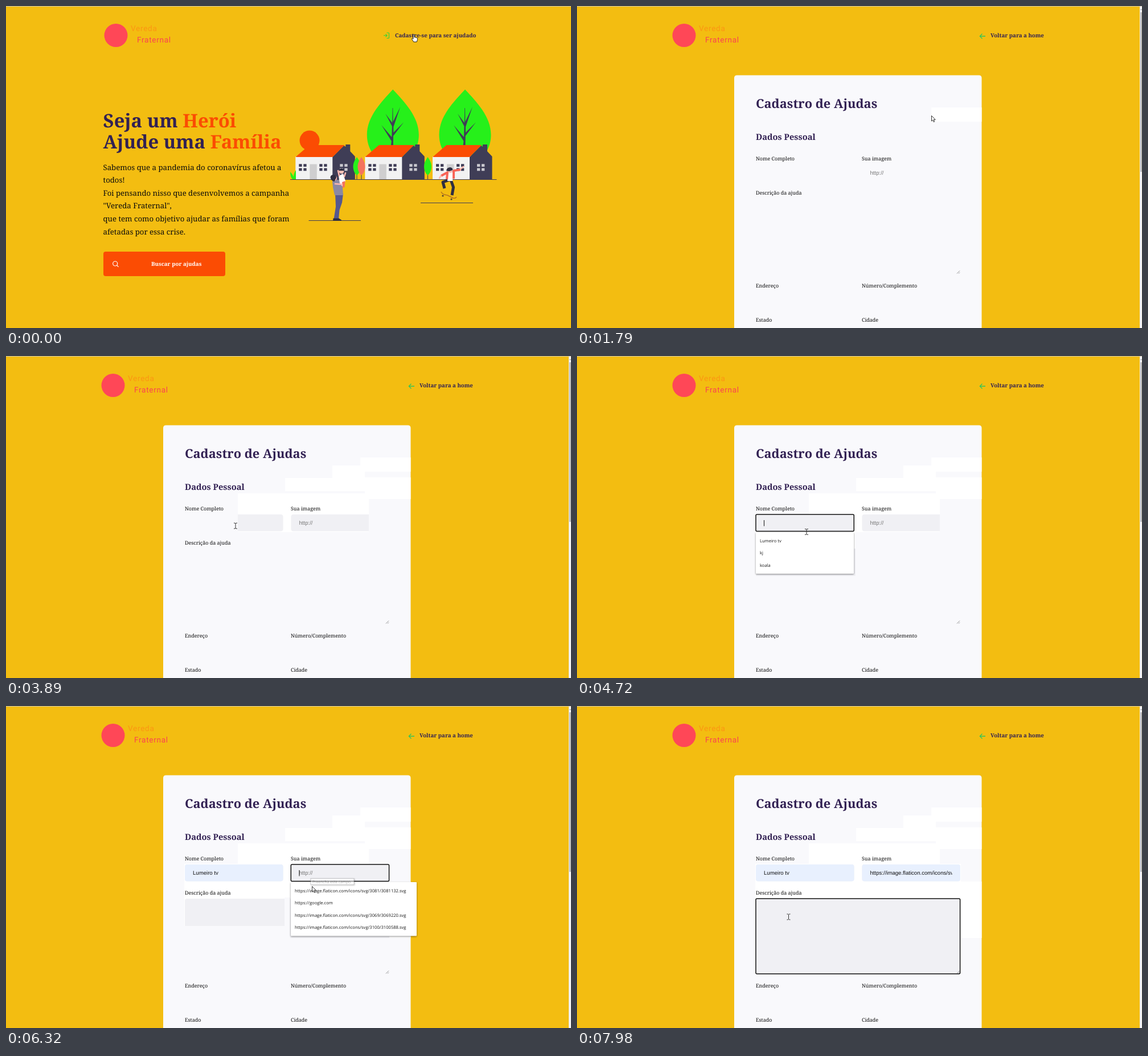
An HTML page for the animation above (8000 ms loop, 992 px wide and 565 px high).

```html
<!DOCTYPE html>
<html lang="pt-BR">
<head>
<meta charset="utf-8">
<title>Cadastro de Ajudas</title>
<style>
html,body{margin:0;width:100%;height:100%;overflow:hidden;background:#f3bd11}
svg{display:block;width:100vw;height:100vh}
text{font-family:"Noto Serif",serif;text-rendering:geometricPrecision;white-space:pre}
.b{font-weight:700;fill:#322153}
.nav{font-size:9.7px}
.hero{font-size:32.7px}
.par{font-size:13.18px;fill:#0c0c0c}
.lab{font-size:8.95px;fill:#0c0c0c}
.logo text{font-family:Roboto,sans-serif;font-size:13.6px;letter-spacing:.7px}
.in{font-family:"Liberation Sans",Arial,sans-serif;font-size:9.6px;fill:#111}
.opt{font-family:"Open Sans",sans-serif;font-size:7.6px;fill:#1a1a1a}
.tip{font-family:"Open Sans",sans-serif;font-size:6.7px;fill:#666}
.o{fill:#fb4c03}
.focus{fill:none;stroke:#101010;stroke-width:1.5}
.pop{fill:#fff;filter:drop-shadow(0 1px 1.5px #0007)}
.ground{stroke:#3f3d56;stroke-width:1}
</style>
</head>
<body>
<svg viewBox="0 0 992 565" preserveAspectRatio="none">
<defs>
  <clipPath id="seen"></clipPath>
  <clipPath id="urlBox"><rect x="514" y="280" width="144.5" height="26"/></clipPath>
  <g id="logo" class="logo">
    <circle cx="193" cy="51.5" r="20.5" fill="#ff4757"/>
    <text x="219" y="44" fill="#fc9513">Vereda</text>
    <text x="230" y="64.3" fill="#fb4152">Fraternal</text>
  </g>
  <path id="card" d="M276 565V126.500q0-5 5-5H705.500q5 0 5 5V565z"/>
  <path id="pane" d="M0 0h5.300v4.800H0zM8 0h5.300v4.800H8zM0 7.200h5.300V12H0zM8 7.200h5.300V12H8z"/>
  <g id="house">
    <path fill="#f2f2f2" d="M0 264h66v40H0z"/>
    <path fill="#3f3d56" d="M65 265 85 245 88 247V243H96V255L104.500 264V304.500H65z"/>
    <path class="o" d="M0 265 24.500 244H86L65 265z"/>
    <path fill="#cfcecf" d="M25 277.500h12.500V304H25z"/>
    <g fill="#3f3d56"><use href="#pane" x="6" y="277.300"/><use href="#pane" x="42" y="277.300"/></g>
    <use href="#pane" x="78" y="277.300" fill="#c9c8cf"/>
  </g>
  <g id="tree">
    <path fill="#26f01a" d="M0 146.500C20 168 45.500 194 45.500 226 45.500 240 41 252 33 262H-33C-41 252-45.500 240-45.500 226-45.500 194-20 168 0 146.500z"/>
    <path fill="#3f3d56" d="M-.7 179H0L.3 203 13 177 1 212V222L19 204 .7 228 .5 246H-3.500L-2.500 237-20 209-2 230-1.500 211-13 189-1.200 205z"/>
  </g>
  <path id="leaf" d="M0-16C4-10 6.500-6 6.500 1S3 14 0 16C-3 14-6.500 8-6.500 1S-4-10 0-16z"/>
  <path id="arrow" d="M.5.5V10L2.700 8 4.200 11.500 5.800 10.800 4.300 7.400H7.200z" fill="#fff" stroke="#222" stroke-width=".9"/>
  <path id="beam" d="M-3-5Q-.2-5 0-4 .2-5 3-5M0-4V4M-3 5Q-.2 5 0 4 .2 5 3 5" fill="none" stroke="#333" stroke-width="1"/>
  <path id="hand" d="M-2.400-6.200Q-1.200-7.200-.4-6V-1.500Q.8-2.400 1.700-1.200 2.800-1.900 3.500-.7 4.900-1 4.900.6V2.800L3.600 6.500H-1.700L-4.800 1.800Q-5.400.2-4 .2L-2.600 1.600z" fill="#fff" stroke="#111" stroke-width=".9"/>
</defs>

<path fill="#f3bd11" d="M0 0h992v565H0z"/>

<g data-t="0 470">
  <use href="#logo"/>
  <path d="M668.500 47h3q1 0 1 1v7.500q0 1-1 1h-3M663 51.800h6M666.500 49.300 669 51.800 666.500 54.300" fill="none" stroke="#2bd53a" stroke-width="1.100"/>
  <text class="b nav" x="683" y="55">Cadastre-se para ser ajudado</text>
  <text class="b hero" x="170.500" y="213">Seja um <tspan class="o">Herói</tspan></text>
  <text class="b hero" x="170.500" y="250">Ajude uma <tspan class="o">Família</tspan></text>
  <g id="intro"></g>
  <rect class="o" x="171" y="431" width="214" height="43" rx="4"/>
  <g fill="none" stroke="#fff" stroke-width="1.200"><circle cx="191.700" cy="452" r="4"/><path d="M194.700 455 197.500 457.800"/></g>
  <text class="b nav" x="255" y="456" style="fill:#fff">Buscar por ajudas</text>

  <use href="#tree" x="679.300"/><use href="#tree" x="806"/>
  <circle class="o" cx="533" cy="236" r="17.500"/>
  <use href="#house" x="508.300"/><use href="#house" x="630.300"/><use href="#house" x="749"/>
  <path d="M616 275V304M624 275V304M740.500 275V304" stroke="#3f3d56"/>
  <g fill="#26f01a"><use href="#leaf" x="616" y="281"/><use href="#leaf" x="740.500" y="281"/>
    <path d="M499 291Q505 297 506 304H503Q499 300 499 291zM509 288V304H505Q504 295 509 288z"/></g>
  <use href="#leaf" x="624" y="281" fill="#f4735e"/>
  <path class="ground" d="M499 304.500H861.500M531.500 376.500H623M728 345.500H820"/>

  <path fill="#55588f" d="M578 329H592L590 345 585.500 358 584 374H575.500L579 352z"/>
  <path fill="#2f2e41" d="M574.500 372.500H584.500L589 375.500V377H574z"/>
  <path fill="#8b89a2" d="M573 308Q578 302 586 306L591 318 592 332H577L574 318z"/>
  <path fill="#fff" d="M584 298 592 294 596 307 592 318 586 311z"/>
  <path fill="#f4735e" d="M590 309 595.500 307 594.500 318 591 319z"/>
  <path fill="none" stroke="#ffb9b0" stroke-width="2.600" stroke-linecap="round" d="M585 298 583 289M594 299 596 293M578 312 590 313"/>
  <circle cx="589" cy="290" r="4.300" fill="#ffc2b6"/>
  <path fill="#2f2e41" d="M585 289Q585.500 284.500 590 285 593.500 286 593 289z"/>
  <circle cx="577" cy="302" r="4.200" fill="#ffb9b0"/>
  <path fill="#2f2e41" d="M569.500 301Q570 295.500 576 296.500 580 297 580 301L576.500 308Q571 307 569.500 301z"/>

  <path fill="none" stroke="#2f2e41" stroke-width="5" stroke-linejoin="round" d="M779 305 767 309 770 320M781 305 785.500 318 783 332"/>
  <path fill="#fff" d="M776 292H785L784 307H775z"/>
  <path fill="none" stroke="#f86558" stroke-width="4" stroke-linejoin="round" d="M774 304 775 292 764 298M786 303 786 289 798 287"/>
  <path stroke="#ffb9b0" stroke-width="2.500" stroke-linecap="round" d="M798 286 803 282M763.500 298 761 302"/>
  <circle cx="779.500" cy="289" r="3.800" fill="#ffb9b0"/>
  <path fill="#2f2e41" d="M773 289Q774 283 780 283 785 284 784 288L778 290z"/>
  <path d="M764 326Q766 331 775 332L785 337Q789 338 791 335" fill="none" stroke="#b87320" stroke-width="1.500"/>
  <g fill="#55462f"><circle cx="767" cy="333" r="1.600"/><circle cx="782" cy="339" r="1.600"/></g>
</g>

<g data-t="470 8000">
  <use href="#logo" x="-5"/>
  <path data-t="910 8000" d="M717 53H707.500M711.500 48.800 707.300 53 711.500 57.200" fill="none" stroke="#35c65a" stroke-width="1.300"/>
  <text class="b nav" x="726" y="55">Voltar para a home</text>
  <use href="#card" fill="#f9f9fc"/>
  <g clip-path="url(#seen)">
    <use href="#card" fill="#fff"/>
    <g fill="#f0f0f4">
      <rect x="314" y="278" width="172.500" height="29.500" rx="4"/>
      <rect x="500.500" y="278" width="172.500" height="29.500" rx="4"/>
      <rect x="314" y="338" width="359" height="132.500" rx="4"/>
    </g>
    <g fill="#e8f0fe">
      <rect data-t="5810 8000" x="314" y="278" width="172.500" height="29.500" rx="4"/>
      <rect data-t="7530 8000" x="500.500" y="278" width="172.500" height="29.500" rx="4"/>
    </g>
  </g>
  <text class="b" x="314" y="179.300" font-size="21.800">Cadastro de Ajudas</text>
  <text class="b" x="314" y="235" font-size="14.700">Dados Pessoal</text>
  <g id="labels"></g>
  <path d="M667 469.500 672 464.500M670 469.500 672 467.500" stroke="#777" stroke-width=".8"/>

  <rect class="focus" data-t="4420 5935" x="314" y="278" width="172.300" height="29.500" rx="2"/>
  <rect class="focus" data-t="5935 7530" x="500.300" y="278" width="172.300" height="29.500" rx="2"/>
  <rect class="focus" data-t="7530 8000" x="314" y="338" width="358.600" height="132" rx="2"/>
  <text class="in" data-t="5000 8000" x="328" y="296">Lumeiro tv</text>
  <path data-t="5420 5935" d="M363.500 298.500l1.300-1 1.300 1 1.300-1 1.300 1 1.300-1 1.300 1" fill="none" stroke="#e33" stroke-width=".8"/>
  <text class="in" data-t="470 6470" x="514.500" y="296" style="fill:#777">http://</text>
  <g clip-path="url(#urlBox)"><text class="in" data-t="6470 8000" x="514.500" y="296">https://image.flaticon.com/icons/svg/3081/3081132.svg</text></g>
  <path data-t="4420 5000" d="M328.500 288V298.500" stroke="#111"/>
  <path data-t="5935 6470" d="M515 288V298.500" stroke="#111"/>
  <path data-t="7530 7980" d="M328.500 347V359" stroke="#111"/>

  <g data-t="4420 5280">
    <rect class="pop" x="314" y="309.500" width="172" height="72.500" rx="1"/>
    <rect data-t="5000 5280" x="314" y="313.500" width="172" height="21.500" fill="#ececee"/>
    <g id="names"></g>
  </g>
  <g data-t="6060 6850">
    <rect class="pop" x="500" y="309" width="221" height="94.500" rx="1"/>
    <rect data-t="6470 6850" x="500" y="313.500" width="221" height="21.500" fill="#ececee"/>
    <g id="links"></g>
  </g>
  <g id="tip" data-t="6200 6470">
    <rect x="535" y="302.500" width="76" height="11" fill="#fff" stroke="#888" stroke-width=".8" style="filter:drop-shadow(1px 1px 1px #0006)"/>
    <text class="tip" x="538" y="310.500">Preencha este campo.</text>
  </g>
  <path fill="#f1f1f1" d="M988 0h4v565h-4z"/>
  <path fill="#bcbcbc" d="M989 11h3v280h-3z"/>
  <path fill="#777" d="M989.300 7 990.500 5.500 991.700 7z"/>
</g>
<path fill="#cfc7ab" d="M0 0h992v1H0z"/>
<use id="cursor"/>
</svg>
<script>
const LOOP = 8000;
const $ = id => document.getElementById(id);
const NS = 'http://www.w3.org/2000/svg';

function add(parent, tag, attrs, text = '') {
  const el = document.createElementNS(NS, tag);
  for (const k in attrs) el.setAttribute(k, attrs[k]);
  el.textContent = text;
  $(parent).append(el);
}

function lines(parent, cls, x, y, step, list) {
  list.forEach((s, i) => add(parent, 'text', {class: cls, x, y: y + i * step}, s));
}

lines('intro', 'par', 170.5, 287.5, 22.6, [
  'Sabemos que a pandemia do coronavírus afetou a', 'todos!',
  'Foi pensando nisso que desenvolvemos a campanha', '"Vereda Fraternal",',
  'que tem como objetivo ajudar as famílias que foram', 'afetadas por essa crise.']);
lines('labels', 'lab', 314, 271, 60, ['Nome Completo', 'Descrição da ajuda']);
lines('labels', 'lab', 314, 493.5, 60, ['Endereço', 'Estado']);
lines('labels', 'lab', 500, 271, 60, ['Sua imagem']);
lines('labels', 'lab', 500, 493.5, 60, ['Número/Complemento', 'Cidade']);
lines('names', 'opt', 321, 326.7, 21.5, ['Lumeiro tv', 'kj', 'koala']);
const icon = n => `https://image.flaticon.com/icons/svg/${n}.svg`;
lines('links', 'opt', 507, 326.7, 21.5,
  [icon('3081/3081132'), 'https://google.com', icon('3069/3069220'), icon('3100/3100588')]);

// areas repainted so far: time, x, y, width, height
[
  [1790, 622, 178, 148, 25], [1950, 573, 192, 57, 35], [2090, 504, 215, 76, 19],
  [2620, 490, 222, 21, 15], [2990, 490, 214, 153, 23], [3150, 636, 214, 294, 11],
  [3410, 630, 213, 293, 38], [3530, 407, 241, 230, 68], [4420, 313, 277, 176, 109],
  [5420, 328, 287, 211, 49], [5935, 499, 277, 175, 32], [6060, 499, 308, 223, 99],
  [7010, 370, 318, 172, 57], [7530, 313, 277, 361, 194]
].forEach(([t, x, y, width, height]) =>
  add('seen', 'rect', {x, y, width, height, 'data-t': t + ' ' + LOOP}));

// pointer: time, shape, x, y
const moves = [
  [0, 'hand', 717.5, 56.5], [910, 'arrow', 729, 99], [1240, 'arrow', 766, 168],
  [1390, 'arrow', 764, 170], [1510, 'arrow', 762, 171], [1660, 'arrow', 700, 184],
  [1790, 'arrow', 622, 192], [1950, 'arrow', 573, 215], [2090, 'arrow', 540, 219],
  [2210, 'arrow', 520, 221], [2340, 'arrow', 510, 222], [2460, 'arrow', 504, 222],
  [2620, 'arrow', 495, 225], [2740, 'arrow', 490, 225], [2990, 'arrow', 636, 214],
  [3150, 'arrow', 923, 214], [3290, 'arrow', 742, 239], [3410, 'arrow', 630, 241],
  [3530, 'beam', 411, 303], [3650, 'beam', 406, 301], [3770, 'beam', 404, 299],
  [3890, 'beam', 403, 298], [4010, 'beam', 402.5, 297], [4720, 'beam', 403, 308.5],
  [4870, 'arrow', 402, 318], [5000, 'arrow', 401, 322], [5420, 'arrow', 440, 316],
  [5540, 'beam', 510, 302], [5660, 'beam', 536, 296.5], [6320, 'arrow', 537, 316],
  [6470, 'arrow', 536, 320], [6590, 'arrow', 535, 322],
  [7010, 'beam', 410, 361], [7130, 'beam', 372.5, 370], [7280, 'beam', 371.5, 370]
];

const timed = [...document.querySelectorAll('[data-t]')].map(el => {
  const [from, to] = el.dataset.t.split(' ').map(Number);
  return {el, from, to};
});

function draw(t) {
  for (const {el, from, to} of timed) el.style.display = t >= from && t < to ? '' : 'none';
  $('tip').style.opacity = t < 6320 ? .85 : .5;
  const [, shape, x, y] = moves.findLast(m => m[0] <= t);
  $('cursor').setAttribute('href', '#' + shape);
  $('cursor').setAttribute('transform', `translate(${x} ${y})`);
}

const start = performance.now();
function tick() {
  draw((performance.now() - start) % LOOP);
  requestAnimationFrame(tick);
}
tick();
</script>
</body>
</html>
```
